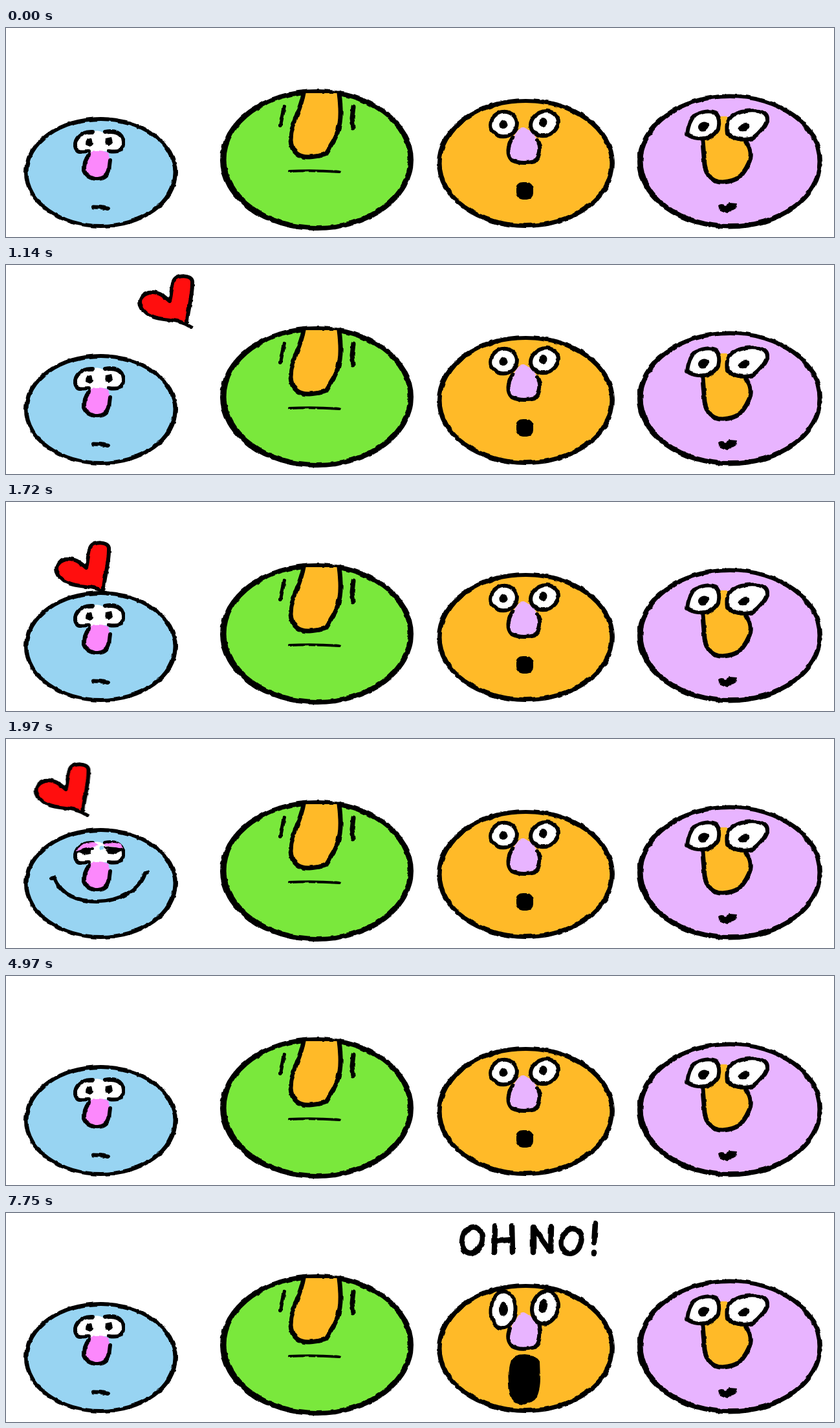
An HTML page without scripts for the animation above (8000 ms loop, 1280 px wide and 324 px high).

```html
<!DOCTYPE html>
<html lang="en">
<head>
<meta charset="utf-8">
<title>Four faces</title>
<style>
html, body { margin: 0; width: 100%; height: 100%; overflow: hidden; background: #fff; }
svg { display: block; width: 100%; height: 100%; }

.ink { fill: none; stroke: #000; stroke-width: 6; stroke-linecap: round; stroke-linejoin: round; }
.thin { stroke-width: 4; }
.thick { stroke-width: 7; }
.letters { stroke-width: 8.5; }
.white { fill: #fff; }
.blue { fill: #98d4f2; }
.green { fill: #7ae83c; }
.orange { fill: #ffba28; }
.lilac { fill: #e8b4ff; }
.pink { fill: #fc88fc; }
.red { fill: #ff0e0e; }

/* 8 s loop: 1 % = 80 ms */
.heart, .calm, .love, .oh, .gasp, .shout { animation: 8s step-end infinite; }
.heart { animation-name: float; }
.calm { animation-name: calm; }
.love { animation-name: love; }
.oh { animation-name: oh; }
.gasp { animation-name: gasp; }
.shout { animation-name: shout; }

/* drops onto the head, rests, then hops up in three poses */
@keyframes float {
  0% { visibility: hidden; transform: translate(49px, -25.5px); }
  12.5% { visibility: visible; transform: translate(49px, -25.5px); animation-timing-function: steps(3); }
  14.25% { visibility: visible; transform: none; animation-timing-function: steps(4); }
  17% { visibility: visible; transform: translate(-64px, 34px); animation-timing-function: steps(3); }
  19% { visibility: visible; transform: translate(-113px, 59px); }
  21.5% { visibility: visible; transform: translate(-129px, 46px); }
  22.75% { visibility: visible; transform: translate(-145px, 35px); }
  24.625% { visibility: visible; transform: translate(-160.5px, 22px); }
  49.625%, 100% { visibility: hidden; transform: translate(-160.5px, 22px); }
}
@keyframes calm {
  0%, 49.625%, 100% { visibility: visible; }
  24.625% { visibility: hidden; }
}
@keyframes love {
  0%, 49.625%, 100% { visibility: hidden; }
  24.625% { visibility: visible; }
}
@keyframes oh {
  0% { visibility: visible; }
  95.25%, 100% { visibility: hidden; }
}
@keyframes gasp {
  0%, 96.875%, 100% { visibility: hidden; }
  95.25% { visibility: visible; }
}
@keyframes shout {
  0% { visibility: hidden; }
  96.875%, 100% { visibility: visible; }
}
</style>
</head>
<body>
<svg viewBox="0 0 1280 324">
  <defs>
    <filter id="rough" filterUnits="userSpaceOnUse" x="0" y="-30" width="1280" height="360" color-interpolation-filters="sRGB">
      <feTurbulence type="fractalNoise" baseFrequency=".07" numOctaves="2" seed="4"/>
      <feDisplacementMap in="SourceGraphic" scale="4" xChannelSelector="R" yChannelSelector="G"/>
    </filter>
  </defs>

  <!-- blue -->
  <g filter="url(#rough)">
    <ellipse cx="146.5" cy="224" rx="118.5" ry="86"/>
    <ellipse class="blue" cx="146.5" cy="224" rx="112" ry="80"/>
    <path class="white" d="M107 182C107 168 118 159 134 161Q141 157 150 162C170 156 181 164 181 176C182 190 176 193 158 192H128C114 194 107 192 107 182Z"/>
    <path class="pink" d="M129 193Q143 188 157 194L162 206C162 225 155 235 141 235C128 234 120 226 121 213Z"/>
    <path class="ink" stroke-width="5" d="M128 197Q120 206 121 221Q126 234 142 234Q155 233 159 221L161 205"/>
    <path class="ink" d="M134 161C117 160 106 171 107 183C108 193 117 192 128 191M153 161C168 158 180 162 181 176C182 190 176 193 159 191"/>
  </g>
  <g class="calm"><g filter="url(#rough)">
    <path d="M124 173L133 170L135 179L130 184L123 181ZM154 171L163 169L165 177L160 182L153 180Z"/>
    <path class="ink" d="M135 277.500L146 278L157 280"/>
  </g></g>
  <g class="love"><g filter="url(#rough)">
    <path class="pink" d="M108 174Q118 159 136 160L143 164Q128 169 115 174ZM151 163Q168 157 178 163L180 171Q166 164 152 166Z"/>
    <path d="M112 176Q120 170 133 170L131 178L121 180ZM154 172Q165 166 178 172L170 178L158 177Z"/>
    <path class="ink thin" d="M109 176Q122 171 135 169M154 169Q166 167 178 171"/>
    <circle class="blue" cx="148" cy="169" r="3.500"/>
    <path class="ink" d="M71 216L75 215C85 242 112 252 140 252C176 252 208 233 215 208L218 207"/>
  </g></g>

  <!-- green -->
  <g filter="url(#rough)">
    <ellipse cx="480.500" cy="204.500" rx="149.500" ry="109.500"/>
    <ellipse class="green" cx="481" cy="204" rx="140.500" ry="102"/>
    <path class="orange ink thick" style="fill:#ffba28" d="M460 101C455 130 440 148 440 174C441 193 454 201 469 200Q485 199 495 195Q499 190 502 182C517 160 520 140 515 101"/>
    <path class="ink" d="M430 122L427 136L424 151"/>
    <path class="ink thick" d="M537 122L535 140L537 154"/>
    <path class="ink thin" stroke-linecap="butt" d="M438 222Q476 220 515 223"/>
  </g>

  <!-- orange -->
  <g filter="url(#rough)">
    <ellipse cx="803.500" cy="209.500" rx="137.500" ry="100.500"/>
    <ellipse class="orange" cx="803.500" cy="209.500" rx="130" ry="93.500"/>
  </g>
  <g class="oh"><g filter="url(#rough)">
    <path class="lilac" d="M783 170Q792 153 800 154Q809 155 822 173Q830 192 817 205Q800 213 785 206Q774 195 783 170Z"/>
    <path class="ink" d="M783 170C775 183 774 197 782 205Q797 212 816 207C828 197 827 183 821 173"/>
    <g class="ink">
      <ellipse class="white" cx="769.500" cy="149" rx="20.500" ry="19" transform="rotate(-20 769.500 149)"/>
      <ellipse class="white" cx="832.500" cy="148" rx="22" ry="18.500" transform="rotate(-25 832.500 148)"/>
    </g>
    <circle cx="769" cy="149.500" r="6.500"/>
    <circle cx="830" cy="146.500" r="6.500"/>
    <rect x="788" y="239" width="27" height="27" rx="10"/>
  </g></g>
  <g class="gasp"><g filter="url(#rough)">
    <path class="lilac" d="M782 172Q792 153 800 154Q809 155 822 173Q830 192 817 206Q800 214 785 207Q774 195 782 172Z"/>
    <path class="ink" d="M781 174C774 185 775 199 782 206Q797 213 816 208C827 199 827 185 823 174"/>
    <g class="ink">
      <ellipse class="white" cx="769" cy="149.500" rx="20" ry="23"/>
      <ellipse class="white" cx="833" cy="147.500" rx="21" ry="21.500" transform="rotate(15 833 147.500)"/>
    </g>
    <ellipse cx="769" cy="149" rx="6.500" ry="8"/>
    <ellipse cx="830" cy="145.500" rx="6.500" ry="8"/>
    <rect x="782" y="229" width="38" height="52" rx="16"/>
  </g></g>
  <g class="shout"><g filter="url(#rough)">
    <path class="lilac" d="M782 175Q792 153 800 154Q809 155 823 173Q831 196 819 205Q800 216 784 207Q774 195 782 175Z"/>
    <path class="ink" d="M779 179C774 191 776 200 783 207Q797 214 817 208C827 199 826 186 824 175"/>
    <g class="ink">
      <ellipse class="white" cx="768.500" cy="150" rx="19" ry="28.500" transform="rotate(4 768.500 150)"/>
      <ellipse class="white" cx="833.500" cy="146.500" rx="20" ry="25.500" transform="rotate(16 833.500 146.500)"/>
    </g>
    <ellipse cx="769" cy="149" rx="7" ry="10.500"/>
    <ellipse cx="830" cy="144.500" rx="7" ry="10.500" transform="rotate(12 830 144.500)"/>
    <path d="M780 228Q786 219 802 219Q819 220 825 230L826 258Q825 282 817 290Q800 302 786 293Q777 284 777 264Q775 242 780 228Z"/>
    <g class="ink letters" role="img" aria-label="OH NO!">
      <ellipse cx="720.500" cy="42" rx="15" ry="20.500" transform="rotate(16 720.500 42)"/>
      <path d="M756 20L755 61M782 20L783 60M757 44L782 41M815 61L815 22L842 60L843 22"/>
      <ellipse cx="874" cy="43.500" rx="15" ry="19.500" transform="rotate(16 874 43.500)"/>
      <path d="M911 16L909 46M909 61V62"/>
    </g>
  </g></g>

  <!-- lilac -->
  <g filter="url(#rough)">
    <ellipse cx="1119" cy="207" rx="143" ry="104.500"/>
    <ellipse class="lilac" cx="1119.500" cy="206.500" rx="135" ry="97.500"/>
    <path class="orange" d="M1077 174L1104 136H1115L1145 177C1157 193 1149 210 1142 220Q1130 238 1108 239Q1086 238 1080 215Z"/>
    <path class="ink thick" d="M1077 175L1080 212C1084 233 1095 239 1108 239Q1125 238 1135 230Q1143 221 1147 212C1154 200 1152 186 1144 177"/>
    <g class="ink">
      <path class="white" d="M1053 165Q1055 145 1065 135Q1084 126 1097 131Q1105 142 1101 157Q1094 170 1080 171Q1063 173 1053 165Z"/>
      <path class="white" d="M1115 164Q1112 144 1124 135Q1142 126 1164 129Q1178 133 1177 143Q1170 160 1155 171Q1133 177 1115 164Z"/>
    </g>
    <ellipse cx="1078" cy="152.500" rx="8.500" ry="6.500" transform="rotate(-25 1078 152.500)"/>
    <ellipse cx="1141" cy="154" rx="9" ry="6.500" transform="rotate(-30 1141 154)"/>
    <path d="M1101 275Q1106 271 1112 275L1118 271L1130 272L1128 280L1115 287L1103 283Z"/>
  </g>

  <g class="heart"><g filter="url(#rough)">
    <path class="red" d="M279 88L289 26Q285 14 264 19Q254 34 253 56Q238 42 222 42Q204 48 208 64Q217 83 240 83Z"/>
    <path class="ink" d="M280 87C281 70 289 48 288 25C286 15 265 15 260 24C254 34 257 44 253 56C243 47 233 40 221 42C207 46 204 57 210 67C219 82 237 83 252 85Q268 87 277 91L286 96"/>
  </g></g>
</svg>
</body>
</html>
```
